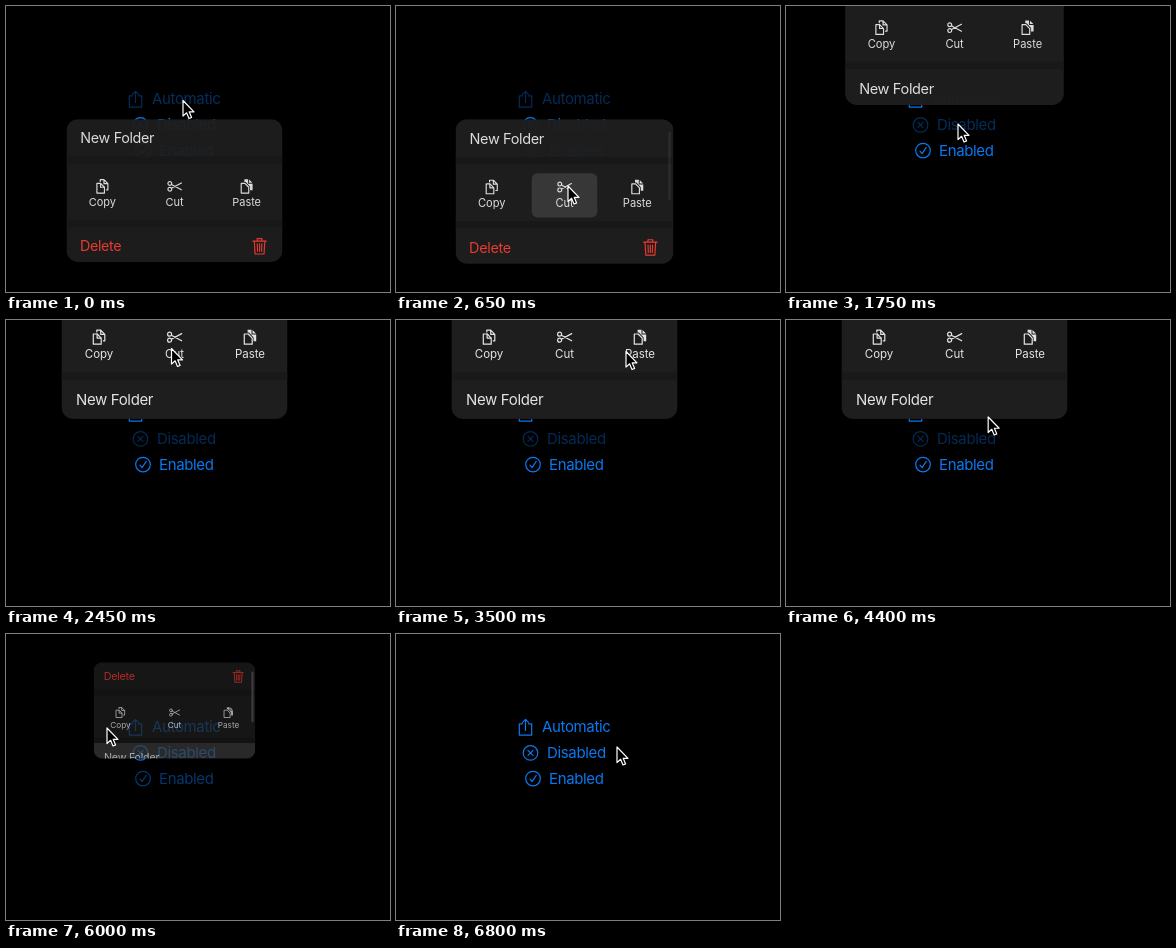
Write an HTML page that moves like this. It is 384 by 286 pixels and loops after 7000 ms.

```html
<!DOCTYPE html>
<html lang="en">
<head>
<meta charset="utf-8">
<title>Menu dismiss behaviour</title>
<style>
  html, body { margin: 0; width: 100%; height: 100%; overflow: hidden; background: #000; }
  svg { display: block; width: 100%; height: 100%; }
  text { font: 15px Inter, "Liberation Sans", sans-serif; letter-spacing: -.35px; fill: currentColor; }
  .small { font-size: 11.5px; letter-spacing: -.05px; text-anchor: middle; }
  .icon { fill: none; stroke: currentColor; stroke-width: 1.2; stroke-linecap: round; stroke-linejoin: round; }
  .label { color: #0a78f0; }
  .menu { color: #e4e4e4; }
  .red { color: #f23c34; }
</style>
</head>
<body>
<svg viewBox="0 0 384 286">
  <defs>
    <clipPath id="clip"><rect id="frame" width="226" rx="12"/></clipPath>
    <path id="sheet" d="M-5.7-3.2h3.9L2.2.9V7H-5.7z"/>
  </defs>

  <g class="label">
    <path class="icon" transform="translate(129.5 .3)" d="M-3-3.7H-6.2V7.7H6.2V-3.7H3M0 3V-8M-3-5.2L0-8.2L3-5.2"/>
    <text x="146" y="5.2">Automatic</text>
  </g>
  <g class="label">
    <g class="icon" transform="translate(134.5 0)"><circle r="7.3"/><path d="M-2.5-2.5l5 5M2.5-2.5l-5 5"/></g>
    <text x="151" y="5.2">Disabled</text>
  </g>
  <g class="label">
    <g class="icon" transform="translate(137 0)"><circle r="7.3"/><path d="M-3 .6L-.9 3L3.2-3.2"/></g>
    <text x="153" y="5.2">Enabled</text>
  </g>

  <g id="menu" class="menu">
    <g clip-path="url(#clip)">
      <rect width="226" height="152" fill="#1e1e1e"/>
      <path d="M0 39h226v7.5H0zM0 105.5h226v7.5H0z" fill="#191919"/>
      <rect id="highlight" fill="#fff" opacity=".12"/>
      <g id="folder"><text x="14.5" y="5.4">New Folder</text></g>
      <g id="delete" class="red">
        <text x="14" y="5.4">Delete</text>
        <path class="icon" transform="translate(202 0)" d="M-7-5.5H7M-2.5-5.8V-8H2.5V-5.8M-5.5-5.2L-4.7 8H4.7L5.5-5.2M-2.4-2.5L-2.1 5.2M0-2.5V5.2M2.4-2.5L2.1 5.2"/>
      </g>
      <g transform="translate(37.5 70.3)">
        <use href="#sheet" class="icon"/>
        <path class="icon" d="M-1.9-3V.9H2M-2.2-5.2V-7H1.7L5.8-2.9V3.6H4.3M1.7-6.8V-2.9H5.6"/>
        <text class="small" y="21">Copy</text>
      </g>
      <g transform="translate(113 70.3)">
        <g class="icon">
          <circle cx="-4.9" cy="-3" r="2"/><circle cx="-4.9" cy="3" r="2"/>
          <path d="M-3.2-2L7.2 3.6M-3.2 2L7.2-3.6"/>
        </g>
        <text class="small" y="21">Cut</text>
      </g>
      <g transform="translate(188.5 70.3)">
        <use href="#sheet" class="icon"/>
        <path d="M-2.4-4.6V-7.4H1.5V-2.7H6.2V4H3.6V.3L-.9-4.6zM2.5-7.2L6-3.7H2.5z" fill="currentColor"/>
        <text class="small" y="21">Paste</text>
      </g>
      <rect id="scrollbar" x="220.5" y="13" width="3" height="71" rx="1.5" fill="#888"/>
    </g>
  </g>

  <path id="cursor" d="M0 0V15.6L3.6 12.3L6 18L8.6 16.9L6.2 11.3H11z" fill="#000" stroke="#fff" stroke-width="1.2" stroke-linejoin="round"/>
</svg>

<script>
const LOOP = 7000, MOVE = 380, PRESS_DELAY = 120, PRESS = 130;
const MENU_WIDTH = 226, MENU_HEIGHT = 152, CENTER = 168.5;
const GAP = 20, FIRST_ROW = 93.2, ROW_STEP = 25.7;

const menus = [
  { open: -230, close: 600, below: true },
  { open: 1500, close: 4700 },
  { open: 5280, close: 5840 },
].map((menu, i) => ({ ...menu, labelY: FIRST_ROW + ROW_STEP * i }));

// Highlight boxes inside the menu.
const tile = column => ({ x: 5 + 74 * column, y: 56, width: 68, height: 46, rx: 6 });
const cut = tile(1), paste = tile(2);
const folder = { x: 0, y: 113, width: MENU_WIDTH, height: 39, rx: 0 };

// Where the pointer arrives, when, and what it presses there.
const stops = [
  { at: 0, x: 177, y: 94.5 },
  { at: 480, x: 172, y: 180, item: cut },
  { at: 1120, x: 172.5, y: 99 },
  { at: 1400, x: 172, y: 118 },
  { at: 2350, x: 165.5, y: 28.5, item: cut },
  { at: 3230, x: 230, y: 31.5, item: paste },
  { at: 4150, x: 150, y: 75, item: folder },
  { at: 4650, x: 340, y: 155 },
  { at: 5220, x: 181, y: 148 },
  { at: 5720, x: 101, y: 94, item: folder },
  { at: 6600, x: 221, y: 113 },
];

const $ = id => document.getElementById(id);
const labels = document.querySelectorAll(".label");
const set = (node, attrs) => {
  for (const name in attrs) node.setAttribute(name, attrs[name]);
};
const smooth = u => {
  u = Math.min(1, Math.max(0, u));
  return u * u * (3 - 2 * u);
};

// Critically damped spring in, smooth fade out.
function presence(menu, t, fade) {
  if (t < menu.open) return 0;
  const a = (t - menu.open) * 0.02;
  return (1 - (1 + a) * Math.exp(-a)) * (1 - smooth((t - menu.close) / fade));
}

function pointerAt(t) {
  const i = stops.findLastIndex(stop => stop.at <= t);
  const from = stops[i], to = stops[i + 1] || from;
  const duration = Math.min(MOVE, to.at - from.at) || 1;
  const u = smooth((t - to.at + duration) / duration);
  return [from.x + (to.x - from.x) * u, from.y + (to.y - from.y) * u];
}

// A press is brief, but stays lit while its menu closes.
function pressedItem(menu, t) {
  const stop = stops.findLast(s => s.at + PRESS_DELAY <= t);
  const lit = stop && (t < stop.at + PRESS_DELAY + PRESS || t > menu.close);
  return lit ? stop.item : null;
}

function drawMenu(menu, shown, t) {
  const scale = 0.2 + 0.8 * shown;
  const height = MENU_HEIGHT * (0.6 + 0.4 * scale);
  const top = menu.below ? menu.labelY + GAP : menu.labelY - GAP - height * scale;
  set($("menu"), {
    opacity: shown ** 0.7,
    transform: `translate(${CENTER - MENU_WIDTH / 2 * scale} ${top}) scale(${scale})`,
  });
  set($("frame"), { height });
  set($("folder"), { transform: `translate(0 ${menu.below ? 20 : 133})` });
  set($("delete"), { transform: `translate(0 ${menu.below ? 133 : 20})` });
  set($("scrollbar"), { opacity: 0.5 * smooth((t - menu.close) / 150) });

  const item = pressedItem(menu, t);
  set($("highlight"), { visibility: item ? "inherit" : "hidden", ...item });
}

function draw(t) {
  menus.forEach((menu, i) => set(labels[i], {
    opacity: 1 - 0.65 * presence(menu, t, 650),
    transform: `translate(0 ${menu.labelY})`,
  }));
  const active = menus.find(menu => presence(menu, t, 400) > 0);
  set($("menu"), { visibility: active ? "visible" : "hidden" });
  if (active) drawMenu(active, presence(active, t, 400), t);
  set($("cursor"), { transform: `translate(${pointerAt(t)})` });
}

const start = performance.now();
function tick() {
  draw((performance.now() - start) % LOOP);
  requestAnimationFrame(tick);
}
tick();
</script>
</body>
</html>
```
